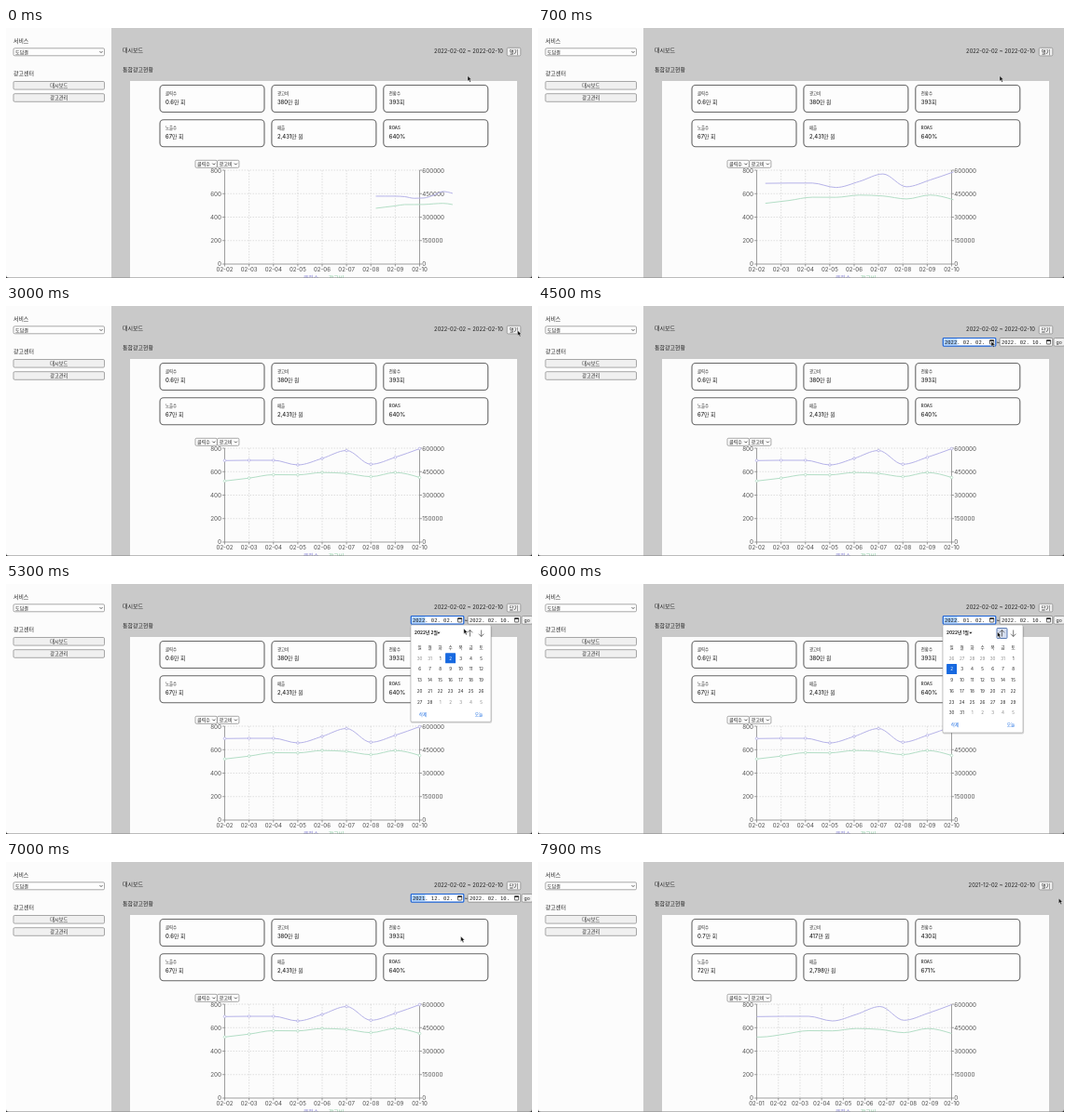
Recreate the animation shown at these times as an HTML page. Size 564x269 px, loop 8 s.

```html
<!DOCTYPE html>
<html lang="ko">
<head>
<meta charset="utf-8">
<style>
html, body { margin: 0; width: 100%; height: 100%; overflow: hidden; background: #c9c9c9; }
svg { display: block; width: 100vw; height: 100vh; }
text { font-family: Inter, "Noto Sans CJK KR", "Noto Sans CJK", sans-serif; fill: #222; white-space: pre; }
.mono { font-family: "DejaVu Sans Mono", monospace; }
</style>
</head>
<body>
<svg viewBox="0 0 564 269" preserveAspectRatio="none">
  <g id="page"></g>
  <g id="live"></g>
</svg>
<script>
const LOOP = 8000;
const OPEN = 3200, FOCUS = 4300, POPUP = 4600, JAN = 5600, DEC = 6200, CLOSE = 6800, SUBMIT = 7700;
const LEFT = 234.5, RIGHT = 443.5, TOP = 153, BOTTOM = 254;
const BLUE = '#b5b2e8', GREEN = '#b3dec6';

const el = id => document.getElementById(id);
const text = (x, y, size, str, more = '') =>
  `<text x="${x}" y="${y}" font-size="${size}" ${more}>${str}</text>`;
const rect = (x, y, w, h, fill, stroke = 'none', r = 0, sw = .7) =>
  `<rect x="${x}" y="${y}" width="${w}" height="${h}" rx="${r}" fill="${fill}" stroke="${stroke}" stroke-width="${sw}"/>`;
const path = (d, stroke, w, more = '') =>
  `<path d="${d}" fill="none" stroke="${stroke}" stroke-width="${w}" ${more}/>`;
const MID = 'text-anchor="middle"', END = 'text-anchor="end"', MEDIUM = 'font-weight="500"';

const button = (x, y, w, h, label) =>
  rect(x, y, w, h, '#f0f0f0', '#858585', 1.3) +
  text(x + w / 2, y + h / 2 + 1.9, 5.2, label, MID);
const select = (x, y, w, h, label) =>
  rect(x, y, w, h, '#fdfdfd', '#858585', 1.3) + text(x + 2, y + h / 2 + 1.9, 5.1, label) +
  path(`M${x + w - 5} ${y + h / 2 - .7}l1.5 1.5l1.5 -1.5`, '#333', .8);

function drawPage() {
  let s = rect(0, 0, 564, 269, '#c9c9c9') + rect(0, 0, 113, 269, '#fcfcfc') + rect(133, 57, 415, 212, '#fcfcfc');
  s += text(8, 15.8, 5.9, '서비스', MEDIUM) + select(8, 21.8, 97.5, 8, '도담결');
  s += text(8, 51, 6, '광고센터', MEDIUM) + button(8, 57.5, 97.5, 8.6, '대시보드') + button(8, 70.7, 97.5, 8.6, '광고관리');
  s += text(125, 25.6, 6, '대시보드', MEDIUM) + text(125, 46.6, 6, '통합광고현황', MEDIUM);
  s += select(203, 142.3, 23.3, 8, '클릭수') + select(226.6, 142.3, 23.3, 8, '광고비');
  for (let i = 0; i < 5; i++) {
    const y = TOP + i * (BOTTOM - TOP) / 4, base = y + (i ? 2.3 : 3.2);
    if (i < 4) s += path(`M${LEFT} ${y}H${RIGHT}`, '#ccc', .6, 'stroke-dasharray="1.5 1.5"');
    s += path(`M${LEFT - 2.5} ${y}h2.5M${RIGHT} ${y}h2.5`, '#777', .7);
    s += text(231, base, 6.3, 800 - i * 200, END + ' fill-opacity=".75"');
    s += text(446.3, base, 6.3, 600000 - i * 150000, 'fill-opacity=".75"');
  }
  s += path(`M${LEFT} ${TOP}V${BOTTOM}H${RIGHT}V${TOP}`, '#777', .7);
  s += text(327, 271.3, 6, '클릭수', MID + ' style="fill:#8884d8"') + text(354, 271.3, 6, '광고비', MID + ' style="fill:#82ca9d"');
  s += path('M0 268.7H564', '#8a8a8a', .7) + '<path d="M0 266Q0 269 3 269H0ZM564 266Q564 269 561 269H564Z" fill="#222"/>';
  el('page').innerHTML = s;
}

// CSS "ease" timing curve
function ease(x) {
  if (x <= 0) return 0;
  if (x >= 1) return 1;
  let a = 0, b = 1, u;
  for (let i = 0; i < 24; i++) {
    u = (a + b) / 2;
    if (.75 * u * (1 - u) + u ** 3 < x) a = u; else b = u;
  }
  return .3 * u * (1 - u) ** 2 + 3 * u * u * (1 - u) + u ** 3;
}

const mix = (a, b, p) => a + (b - a) * p;
const spread = (ys, x0, x1) => ys.map((y, i) => [mix(x0, x1, i / (ys.length - 1)), y]);
const blend = (from, to, p) => to.map((q, i) => {
  const o = from[Math.floor(i * from.length / to.length)];
  return [mix(o[0], q[0], p), mix(o[1], q[1], p)];
});

const series = [
  { color: BLUE, start: [181, 181, 181, 181.5, 183.3, 183, 180, 176, 178], ys: [166.3, 166, 166, 171, 164, 155.5, 170.3, 162.8, 153.5] },
  { color: GREEN, start: [194, 192.7, 191.5, 190, 190, 189.9, 189.2, 188.7, 190], ys: [188.3, 185.2, 181.5, 181.7, 179.2, 180.2, 183.6, 179.2, 184.5] }
];

function points(s, t) {
  const now = spread(s.ys, LEFT, RIGHT);
  if (t < 1000) {
    const e0 = ease(1 / 3), p = (ease((t + 500) / 1500) - e0) / (1 - e0);
    return blend(spread(s.start, 397, 479), now, p);
  }
  if (t < SUBMIT) return now;
  return blend(now, spread([s.ys[0], ...s.ys], LEFT, RIGHT), ease((t - SUBMIT + 30) / 1500));
}

// monotone cubic through the points
function curve(p) {
  const n = p.length, h = [], k = [], m = [];
  for (let i = 0; i < n - 1; i++) {
    h[i] = p[i + 1][0] - p[i][0] || 1e-6;
    k[i] = (p[i + 1][1] - p[i][1]) / h[i];
  }
  for (let i = 1; i < n - 1; i++) {
    const avg = (k[i - 1] * h[i] + k[i] * h[i - 1]) / (h[i - 1] + h[i]);
    m[i] = (Math.sign(k[i - 1]) + Math.sign(k[i])) * Math.min(Math.abs(k[i - 1]), Math.abs(k[i]), Math.abs(avg) / 2);
  }
  m[0] = (3 * k[0] - m[1]) / 2;
  m[n - 1] = (3 * k[n - 2] - m[n - 2]) / 2;
  let d = `M${p[0]}`;
  for (let i = 0; i < n - 1; i++) {
    const [x, y] = p[i], [X, Y] = p[i + 1], c = h[i] / 3;
    d += `C${x + c} ${y + m[i] * c} ${X - c} ${Y - m[i + 1] * c} ${X} ${Y}`;
  }
  return d;
}

function chart(t) {
  const n = t < SUBMIT ? 9 : 10;
  let s = '';
  for (let i = 0; i < n; i++) {
    const x = mix(LEFT, RIGHT, i / (n - 1)), day = String(11 - n + i).padStart(2, '0');
    if (i && i < n - 1) s += path(`M${x} ${TOP}V${BOTTOM}`, '#ccc', .6, 'stroke-dasharray="1.5 1.5"');
    s += path(`M${x} ${BOTTOM}v2.5`, '#777', .7) + text(x, 262.3, 6.1, '02-' + day, MID + ' fill-opacity=".8"');
  }
  for (const line of series) {
    const p = points(line, t);
    s += path(curve(p), line.color, 1);
    if (t >= 1000 && t < SUBMIT)
      for (const [x, y] of p) s += `<circle cx="${x}" cy="${y}" r="1.3" fill="#fff" stroke="${line.color}" stroke-width=".8"/>`;
  }
  return s;
}

const labels = ['클릭수', '광고비', '전환수', '노출수', '매출', 'ROAS'];
const before = ['0.6만 회', '380만 원', '393회', '67만 회', '2,431만 원', '640%'];
const after = ['0.7만 회', '417만 원', '430회', '72만 회', '2,798만 원', '671%'];

function cards(t) {
  const values = t < SUBMIT ? before : after;
  return labels.map((label, i) => {
    const x = 165 + i % 3 * 119.9, y = i < 3 ? 61.5 : 98.8;
    return rect(x, y, 112, 29, '#fdfdfd', '#666', 4, 1.1) +
      text(x + 6, y + 10, 4.4, label, MEDIUM) + text(x + 6, y + 20.3, 5.9, values[i], MEDIUM);
  }).join('');
}

function field(x, value, focused) {
  return rect(x, 34.5, 56.5, 8.6, '#fff', focused ? '#1a62d6' : '#777', .8, focused ? 1.2 : .7) +
    (focused ? rect(x + 1, 35.4, 14.2, 6.8, '#a9cffb') : '') +
    text(x + 1.7, 40.8, 5.5, value, 'class="mono"') +
    rect(x + 50.2, 36.8, 4.2, 4.2, 'none', '#222', .4, .7) + rect(x + 50, 36.5, 4.6, 1.4, '#222');
}

function picker(t) {
  const value = t < JAN ? '2022. 02. 02.' : t < DEC ? '2022. 01. 02.' : '2021. 12. 02.';
  return field(434.3, value, t >= FOCUS) + text(493.2, 40.6, 5.5, '~', MID) +
    field(495.2, '2022. 02. 10.', false) + button(553, 34.5, 11.5, 8.6, 'go');
}

function calendar(t) {
  const [year, month] = t < JAN ? [2022, 1] : t < DEC ? [2022, 0] : [2021, 11];
  const lead = new Date(Date.UTC(year, month, 1)).getUTCDay();
  const days = new Date(Date.UTC(year, month + 1, 0)).getUTCDate();
  const rows = Math.ceil((lead + days) / 7), lift = (6 - rows) * 11.7;
  let s = rect(433.6, 45.5, 87.5, 116 - lift, '#000', 'none', 2).replace('/>', ' opacity=".16"/>') +
    rect(434, 44, 86, 116 - lift, '#fff', '#aaa', 1.5, .6);
  s += text(438, 54.3, 4.7, `${year}년 ${month + 1}월`, 'font-weight="700"') + '<path d="M462.3 51.8h3.2l-1.6 2z" fill="#222"/>';
  if (t >= 5350) s += rect(492, 47.5, 11, 11, '#d5def0', '#4a6fae', .8, .9);
  s += path('M497.5 56.5v-7M494.8 52.3l2.7 -2.8l2.7 2.8M509.7 49.5v7M507 53.7l2.7 2.8l2.7 -2.8', '#555', .8);
  [...'일월화수목금토'].forEach((d, i) => s += text(443.6 + i * 11, 69.6, 4.5, d, MID));
  for (let i = 0; i < rows * 7; i++) {
    const x = 443.6 + i % 7 * 11, y = 81.6 + Math.floor(i / 7) * 11.75, n = i - lead + 1;
    const on = n === 2, inside = n > 0 && n <= days;
    if (on) s += rect(x - 5.5, y - 7.3, 11, 11, '#1769e0', 'none', .6);
    s += text(x, y, 4.6, new Date(Date.UTC(year, month, n)).getUTCDate(),
      `${MID} style="fill:${on ? '#fff' : inside ? '#222' : '#888'}"`);
  }
  return s + text(447, 153.2 - lift, 4.6, '삭제', MID + ' style="fill:#1769e0"') +
    text(507, 153.2 - lift, 4.6, '오늘', MID + ' style="fill:#1769e0"');
}

// time, x, y of the pointer tip
const moves = [
  [0, 495, 51.5], [1000, 495, 51.5], [1800, 491, 44], [2200, 491, 42], [2500, 491, 42],
  [2950, 548.6, 26.3], [3400, 548.6, 26.3], [4150, 486, 37.8], [5000, 486, 37.8], [5450, 492.5, 51.5],
  [6300, 492.5, 51.5], [6700, 487.6, 80], [7050, 487.6, 80], [7550, 558.3, 39], [LOOP, 558.3, 39]
];

function cursor(t) {
  const i = moves.findIndex(m => m[0] > t), [t0, x0, y0] = moves[i - 1], [t1, x1, y1] = moves[i];
  const u = (t - t0) / (t1 - t0), p = u * u * (3 - 2 * u);
  return `<path transform="translate(${mix(x0, x1, p)} ${mix(y0, y1, p)})" d="M0 0V5.7L1.3 4.5L2.3 6.8L3.4 6.3L2.4 4.1H4.1Z" fill="#111" stroke="#fff" stroke-width=".4"/>`;
}

function draw(t) {
  const open = t >= OPEN && t < SUBMIT;
  const range = (t < SUBMIT ? '2022-02-02' : '2021-12-02') + ' ~ 2022-02-10';
  el('live').innerHTML = text(533, 27.3, 5.8, range, END) +
    button(537.2, 21.3, 14.6, 8.6, open ? '닫기' : '열기') +
    cards(t) + chart(t) + (open ? picker(t) : '') +
    (t >= POPUP && t < CLOSE ? calendar(t) : '') + cursor(t);
}

const begin = performance.now();
function tick() {
  draw((performance.now() - begin) % LOOP);
  requestAnimationFrame(tick);
}
drawPage();
tick();
</script>
</body>
</html>
```
